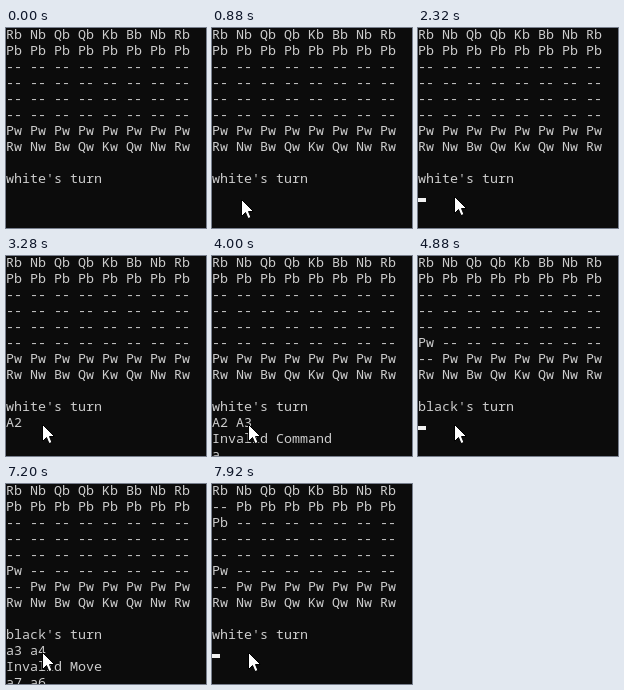
Animation of 200 by 200 pixels, one loop 8000 ms. Source, as an HTML page with a canvas:

```html
<!DOCTYPE html>
<html lang="en">
<head>
<meta charset="utf-8">
<title>Console chess</title>
<style>
  html, body { margin: 0; width: 100%; height: 100%; overflow: hidden; background: #0c0c0c; }
  canvas { display: block; width: 200px; height: 200px; }
</style>
</head>
<body>
<canvas id="stage" width="200" height="200"></canvas>
<script>
const ctx = document.getElementById('stage').getContext('2d');
const STEP = 80, STEPS = 100;
const CELL_W = 8, CELL_H = 16, TOP = -2, INPUT_ROW = 10;
const FOCUS = 17, DESELECT = 26, CLICK_END = 20;

// Each turn: first step, side to move, cells changed on the board [row, column, piece], keys [step, text]
const turns = [
  { start: 0, side: 'white', moves: [], keys: [
    [25, ''], [34, 'A'], [40, '2'], [42, ' '], [44, 'A'], [46, '3'], [48, '\nInvalid Command\n'],
    [50, 'a'], [52, '2'], [54, ' '], [57, 'a'], [58, '3']] },
  { start: 61, side: 'black', moves: [[6, 0, '--'], [5, 0, 'Pw']], keys: [
    [64, 'a'], [66, '3'], [68, ' '], [70, 'a'], [72, '4'], [75, '\nInvalid Move\n'],
    [83, 'a'], [85, '7'], [87, ' '], [88, 'a'], [90, '6']] },
  { start: 91, side: 'white', moves: [[1, 0, '--'], [2, 0, 'Pb']], keys: [] },
];

// Pointer stops: [step, x, y]
const path = [
  [3, 112, 204], [4, 100, 198], [7, 68, 184], [10, 36, 173], [12, 21, 168], [13, 19, 166],
  [14, 19, 167], [15, 20, 164], [16, 22, 161], [19, 22, 161], [20, 24, 164], [22, 31, 177],
  [24, 35, 171], [25, 36, 168],
];

const arrow = [[0, 0], [0, 17], [4, 13], [6.5, 19], [9.5, 18], [7, 12], [12, 12]];

function pointerAt(step) {
  if (step <= path[0][0]) return null;
  const next = path.findIndex(stop => stop[0] >= step);
  if (next < 0) return path[path.length - 1].slice(1);
  const [s0, x0, y0] = path[next - 1], [s1, x1, y1] = path[next];
  const k = (step - s0) / (s1 - s0);
  return [Math.round(x0 + (x1 - x0) * k), Math.round(y0 + (y1 - y0) * k)];
}

function boardAfter(played) {
  const rank = (side, names) => names.split('').map(name => name + side);
  const board = [rank('b', 'RNQQKBNR'), rank('b', 'PPPPPPPP')];
  for (let i = 0; i < 4; i++) board.push(Array(8).fill('--'));
  board.push(rank('w', 'PPPPPPPP'), rank('w', 'RNBQKQNR'));
  for (const turn of played)
    for (const [row, col, piece] of turn.moves) board[row][col] = piece;
  return board.map(cells => cells.join(' '));
}

function fillCell(col, row, inset) {
  ctx.fillStyle = '#f2f2f2';
  ctx.fillRect(col * CELL_W, TOP + row * CELL_H + inset, CELL_W, CELL_H - inset);
}

function drawPointer(x, y) {
  ctx.beginPath();
  arrow.forEach(([dx, dy]) => ctx.lineTo(x + dx + 0.5, y + dy + 0.5));
  ctx.closePath();
  ctx.fillStyle = '#fff';
  ctx.fill();
  ctx.strokeStyle = '#000';
  ctx.lineWidth = 1;
  ctx.stroke();
}

function draw(step) {
  const played = turns.filter(turn => turn.start <= step);
  const turn = played[played.length - 1];
  const pressed = turn.keys.filter(key => key[0] <= step);
  const input = pressed.map(key => key[1]).join('').split('\n');
  const lines = [...boardAfter(played), '', turn.side + "'s turn", ...input];
  // The board fills rows 0-7, so the turn line sits on row 9 and input on row 10

  ctx.fillStyle = '#0c0c0c';
  ctx.fillRect(0, 0, 200, 200);
  ctx.font = '13.333px "Noto Sans Mono", "DejaVu Sans Mono", monospace';
  ctx.fillStyle = '#ccc';
  lines.forEach((line, row) => ctx.fillText(line, 0, TOP + row * CELL_H + 13));

  const lastChange = pressed.length ? pressed[pressed.length - 1][0] : turn.start;
  const steady = step >= FOCUS && step < DESELECT;
  const blinkOn = step >= FOCUS && (step - lastChange) % 2 === 0;
  if (steady || blinkOn)
    fillCell(input[input.length - 1].length, INPUT_ROW + Math.max(0, input.length - 1), 12);
  if (steady) fillCell(2, INPUT_ROW, 0);

  const pointer = pointerAt(step);
  if (!pointer) return;
  if (step >= FOCUS - 1 && step < CLICK_END) {
    ctx.beginPath();
    ctx.arc(pointer[0], pointer[1], 12, 0, Math.PI * 2);
    ctx.fillStyle = 'rgba(255, 240, 0, 0.6)';
    ctx.fill();
  }
  drawPointer(...pointer);
}

function tick() {
  draw(Math.floor(performance.now() / STEP) % STEPS);
  requestAnimationFrame(tick);
}
tick();
</script>
</body>
</html>
```
